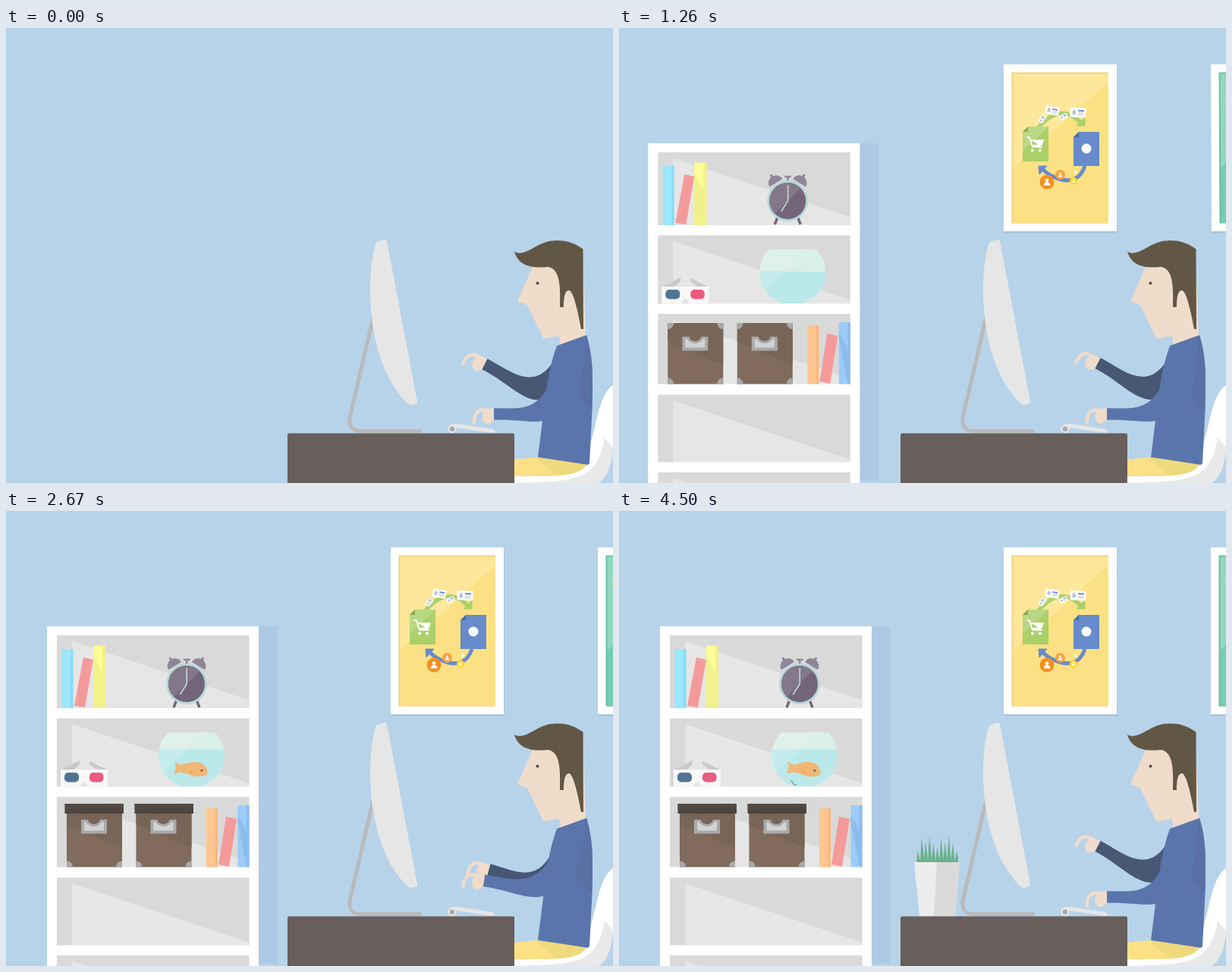
Write an HTML page that moves like this. It is 800x600 px and loops after 4530 ms.

```html
<!DOCTYPE html>
<html lang="en">
<head>
<meta charset="utf-8">
<title>Desk scene</title>
<style>
html, body { margin: 0; width: 100%; height: 100%; overflow: hidden; background: #b7d3ea; }
svg { display: block; width: 800px; height: 600px; }
</style>
</head>
<body>
<svg viewBox="0 0 800 600">
  <defs>
    <g id="bay">
      <path fill="#d9d9d9" d="M67 0h253.500v96h-253.500z"/>
      <path fill="#e6e6e6" d="M87 7.500L320.500 85.500V96H87z"/>
    </g>
    <g id="box">
      <path fill="#806b5d" d="M0 0h73v80.500h-73z"/>
      <path fill="#786558" d="M0 0H73V55L0 25z"/>
      <path fill="#a9a9a9" d="M0 0h8a8 8 0 0 1-8 8zM73 0v8a8 8 0 0 1-8-8zM0 80.500v-8a8 8 0 0 1 8 8zM73 80.500h-8a8 8 0 0 1 8-8z"/>
      <path fill="#a9a9a9" d="M19 18h34v18.500h-34z"/>
      <path fill="#d2d2d2" d="M23 21h26v11.500h-26z"/>
      <path fill="#a9a9a9" d="M25 18a11 9 0 0 0 22 0z"/>
      <path fill="#786558" d="M28 17.500a8 6.500 0 0 0 16 0z"/>
    </g>
    <g id="lidShape">
      <path fill="#4e4541" d="M0-6.500h77.500v13H0z"/>
      <path fill="#584e49" d="M0-6.500H77.500V-2L0 1z" opacity=".5"/>
    </g>
    <g id="bell">
      <path fill="#8f8598" d="M-10 5A10 10 0 0 1 10 5z"/>
      <path fill="#8f8598" d="M-1.500-8h3v4h-3z"/>
    </g>
    <g id="hand" fill="#f0dcca">
      <path d="M1-7.500L-10-7Q-16-4-15.500 4Q-15 12-9 13Q-4 13 1 7z"/>
      <path d="M-9-5Q-27-8-26 12" fill="none" stroke="#f0dcca" stroke-width="4.500" stroke-linecap="round"/>
    </g>
    <g id="person" fill="#fff">
      <circle cy="-2.200" r="2.300"/>
      <path d="M-4.500 4.500Q-4 0 0 0T4.500 4.500z"/>
    </g>
    <g id="card">
      <path fill="#fff" d="M-9-5.500h18v11h-18z"/>
      <path fill="#b9c4d4" d="M-6.500-1l2-2.500 2 2.500v3.500h-4z"/>
      <path fill="#678bcb" d="M0-3h7v1.800h-7z"/>
      <path fill="#c6c6c6" d="M0 0h7v1h-7zM0 2h7v1h-7z"/>
    </g>
    <clipPath id="bowlClip"><path d="M213.500 292H275.500A42.500 42.500 0 0 1 257 363H232A42.500 42.500 0 0 1 213.500 292z"/></clipPath>
  </defs>

  <rect width="800" height="600" fill="#b7d3ea"/>

  <g id="shelf">
    <path fill="#aec9e3" d="M333 152h25v445h-25z"/>
    <path fill="#fff" d="M54 152H333V600H54z"/>
    <use href="#bay" y="164"/>
    <path fill="#fff" d="M54 260h279v13h-279z"/>
    <use href="#bay" y="273.500"/>
    <path fill="#fff" d="M54 363.500h279v13.500h-279z"/>
    <use href="#bay" y="377"/>
    <path fill="#fff" d="M54 469.500h279v14h-279z"/>
    <use href="#bay" y="483.500"/>
    <path fill="#fff" d="M54 572.500h279v13.500h-279z"/>
    <use href="#bay" y="586"/>

    <!-- books -->
    <path fill="#9be8fe" d="M73.500 182h15v78h-15z"/>
    <path fill="#8adcf4" d="M85 182h3.500v78h-3.500z"/>
    <path fill="#f49a9a" d="M102 193l13 3-11 63-14-2z"/>
    <path fill="#fdfd96" d="M115 177.500h16v82.500h-16z"/>
    <path fill="#f1f18c" d="M127 177.500h4v82.500h-16V190l12 25z"/>
    <path fill="#fdc690" d="M264 392h15v77.500h-15z"/>
    <path fill="#f6b880" d="M275.500 392h3.500v77.500h-3.500z"/>
    <path fill="#f49a9a" d="M290 403l14 3-10 63-14-3z"/>
    <path fill="#9ccbfa" d="M305.500 388h15v81.500h-15z"/>
    <path fill="#8dbdee" d="M317 388h3.500v81.500h-3.500l-11.500-60v-8l11.500 20z"/>

    <!-- clock -->
    <path d="M225 249l-4 10M251 249l4 10" stroke="#74657a" stroke-width="3.500"/>
    <use href="#bell" transform="translate(220 200) rotate(-32)"/>
    <use href="#bell" transform="translate(256 200) rotate(32)"/>
    <path d="M234 196h8.500M238.200 196v6" stroke="#8f8598" stroke-width="2.600"/>
    <circle cx="238" cy="228" r="27" fill="#b5d9d6"/>
    <circle cx="238" cy="228" r="24" fill="#74657a"/>
    <path fill="#84778a" d="M221 245A24 24 0 0 1 255 211z"/>
    <path d="M238.300 207v21l-9 14" fill="none" stroke="#c9e3e2" stroke-width="1.400"/>

    <!-- glasses -->
    <path fill="#c9c9c9" d="M73 341l24-12v5l-9 8zM133 341l-23-11v4l10 8z"/>
    <path fill="#f8f8f8" d="M72 341h62v22.500h-25l-6-8-6 8h-25z"/>
    <rect x="77" y="345" width="19" height="12.500" rx="5" fill="#4f7595"/>
    <rect x="110" y="345" width="18.500" height="12.500" rx="5" fill="#ec5a7f"/>

    <!-- bowl -->
    <g clip-path="url(#bowlClip)">
      <path fill="#d9efe9" d="M200 290h90v75h-90z"/>
      <path id="water" fill="#bbe9e9"/>
      <path fill="#fff" opacity=".14" d="M200 290H262L208 345L200 340z"/>
    </g>
    <g id="fish">
      <path fill="#f0b775" d="M222 330Q229 336 234 334Q250 328 260 334Q267 340 265 348Q255 352 245 349Q236 345 229 344Q226 346 221 346Q226 339 222 330z"/>
      <path fill="#e5a864" d="M240 342q6 0 8 5-6-1-8-5z"/>
      <circle cx="258" cy="342.200" r="1.300" fill="#5a4c40"/>
    </g>
    <path id="speck" d="M3.500-3.500q1.500 4-2 4t-4.500 2.500" fill="none" stroke="#6f9ea3" stroke-width="1.200"/>

    <use href="#box" x="80" y="389"/>
    <use href="#box" x="171.500" y="389"/>
    <use href="#lidShape" id="lidA"/>
    <use href="#lidShape" id="lidB"/>
  </g>

  <!-- posters hang from their top left corner -->
  <g id="posterA">
    <path fill="#a9c5df" d="M1 2h149v220.500h-149z"/>
    <path fill="#fff" d="M0 0h149v220h-149z"/>
    <path fill="#eed27a" d="M10.500 10.500h127.500v199h-127.500z"/>
    <path fill="#fce184" d="M12.500 12.500H138V209.500H12.500z"/>
    <path fill="#fee79a" d="M12.500 12.500H138V23L12.500 136z"/>
    <g transform="translate(-507 -48)">
      <path d="M553 131Q581 98 608 124" fill="none" stroke="#abd06a" stroke-width="5.500"/>
      <path fill="#abd06a" d="M614 118v11h-11z" stroke="#abd06a"/>
      <path d="M614 182Q606 205 583 200Q568 196 558 186" fill="none" stroke="#678bcb" stroke-width="5"/>
      <path fill="#678bcb" d="M553 182h11l-10 11z" stroke="#678bcb"/>
      <path fill="#abd06a" d="M539 130h27v46h-34v-39z"/>
      <path fill="#b9d884" d="M539 130h27l-34 32v-25z"/>
      <path fill="#85ab4c" d="M539 130v7h-7z"/>
      <path d="M537 144h4l4 13h13M542 148h17l-2 6-13 1z" fill="#fff" stroke="#fff" stroke-width="1.600"/>
      <circle cx="545" cy="161.500" r="2" fill="#fff"/><circle cx="555" cy="161.500" r="2" fill="#fff"/>
      <path fill="#678bcb" d="M606 137h27v45h-34v-38z"/>
      <path fill="#4a6aa8" d="M606 137v7h-7z"/>
      <circle cx="616" cy="159" r="6.500" fill="#fff"/>
      <use href="#card" transform="translate(571 109) rotate(10)"/>
      <use href="#card" transform="translate(605 111.500) rotate(3) scale(1.150)"/>
      <use href="#card" transform="translate(558 120) rotate(-50) scale(.6)"/>
      <use href="#card" transform="translate(586 117) rotate(-25) scale(.6)"/>
      <circle cx="564" cy="203" r="9.500" fill="#f78f1e"/><use href="#person" x="564" y="203"/>
      <circle cx="581.500" cy="193.500" r="6.500" fill="#f9a23f"/><use href="#person" transform="translate(581.500 193.500) scale(.65)"/>
      <circle cx="602" cy="190" r="4" fill="#fbe27a"/><use href="#person" transform="translate(602 190) scale(.5)"/>
      <circle cx="599" cy="201.500" r="5" fill="#fbd52f"/><use href="#person" transform="translate(599 201.500) scale(.5)"/>
    </g>
  </g>
  <g id="posterB">
    <path fill="#a9c5df" d="M1 2h149v220.500h-149z"/>
    <path fill="#fff" d="M0 0h149v220h-149z"/>
    <path fill="#68bfa5" d="M10.500 10.500h127.500v199h-127.500z"/>
    <path fill="#74ccb1" d="M12.500 12.500H138V209.500H12.500z"/>
    <path fill="#94d7c1" d="M12.500 12.500H138V23L12.500 136z"/>
    <circle cx="24.500" cy="44.500" r="5.500" fill="#f3e38b"/>
    <path fill="#fff" d="M20.500 169h60v29h-60z"/>
  </g>

  <g id="plant">
    <path id="grass" fill="#6bb089"/>
    <path fill="#ececec" d="M389 463h60l-6 71.500h-47z"/>
    <path fill="#dadada" d="M419 463h30l-6 71.500h-28z"/>
  </g>

  <path d="M484 381L453.500 512Q450 531.500 468 531.500H545.500" fill="none" stroke="#bababa" stroke-width="5" stroke-linecap="round"/>
  <path fill="#e6e6e6" d="M490 281.500L499 279Q501.500 278.500 502 281L542 492Q542.300 495 540 495.500L534 497Q531 497 529 495C498 465 480 410 480 345Q480 308 487.500 284Q488 282 490 281.500z"/>
  <rect x="371" y="534.500" width="299" height="70" rx="2" fill="#685e5b"/>

  <path fill="#fff" d="M670 591C720 592 758 590 768 573L771 545C779 520 782 482 801 470V555L789 541C784 575 775 592 745 596Q710 600 670 600z"/>
  <path fill="#e9e9e9" d="M789 541L800 554C798 580 791 595 780 600H690C760 597 779 592 789 541z"/>
  <path fill="#fce085" d="M670 569L700 566L766 575L758 583Q742 591 715 591H670z"/>
  <path fill="#efd97d" d="M698 566L766 575L758 583Q745 590 724 590z"/>

  <use href="#hand" id="backHand"/>
  <path id="backArm" fill="#475774"/>
  <path fill="#f0dcca" d="M694 315L674 360L687 365.500L708.500 409.500L729 406L731 420L764 406L760 300L714 312z"/>
  <path fill="#625744" d="M670 295C685 303 700 281 722 280.500C738 279 750 284 760.500 291.500L761 397H758C754 375 748 347 742 346C736 346 735 358 735 368H730C731 340 730 317 714 315C695 317 676 315 670 295z"/>
  <circle cx="700.500" cy="336.500" r="2.100" fill="#5a4c40"/>
  <path fill="#5a75ab" d="M765 405L726 419C718 440 712 470 708 510L701 566L767 576L769 574L772.500 505C774 460 773 430 765 405z"/>
  <path id="shade" fill="#5a70a5"/>
  <use href="#hand" id="frontHand"/>
  <path id="frontArm" fill="#5a75ab"/>

  <path fill="#e6e6e6" d="M586 523Q592 521 602 523L641 529L645.500 532L641 534L594 527z"/>
  <circle cx="588" cy="528.500" r="5.700" fill="#e6e6e6"/>
  <circle cx="588" cy="528.800" r="3.200" fill="#a9a9a9"/>
</svg>
<script>
const LOOP = 4530, TICK = 30, CYCLE = 18;
const el = {};
document.querySelectorAll('[id]').forEach(n => el[n.id] = n);
const clamp = x => Math.min(1, Math.max(0, x));
const mix = (a, b, k) => a + (b - a) * k;
const ramp = (t, from, to) => clamp((t - from) / (to - from));
const place = (node, value) => node.setAttribute('transform', value);
const show = (node, on) => node.setAttribute('visibility', on ? 'visible' : 'hidden');

// Five poses per six ticks: the first pose of each group is held twice.
function poseAt(ms) {
  const tick = Math.floor(ms / TICK);
  return 5 * Math.floor(tick / 6) + Math.max(0, tick % 6 - 1);
}

// 1 = fingers on the keys, 0 = hand raised.
function press(t, hit) {
  const d = ((t - hit) % CYCLE + CYCLE) % CYCLE;
  if (d < 9) return (1 - clamp((d - 1) / 8)) ** 2;
  const x = clamp((5.9 - (CYCLE - d)) / 4.9);
  return x * x * (3 - 2 * x);
}

function drawArm(arm, hand, h, dx, dy) {
  const x = 620 + dx + 23 * h * h, y = 445 + dy + 64 * h;
  const deg = 27 * (1 - h), a = deg * Math.PI / 180;
  const c = Math.cos(a), s = Math.sin(a), w = 7.8;
  const tx = x + s * w, ty = y - c * w, bx = x - s * w, by = y + c * w;
  const p = [
    'M', tx, ty,
    'C', tx + 34 * c, ty + 34 * s, mix(697, 708, h), mix(482, 510, h), 724, mix(435, 445, h),
    'L', 750, 430, 742, 472, mix(712, 708, h), mix(488, 518, h),
    'C', mix(680, 690, h) + dx / 2, mix(498, 521, h), bx + 40 * c, by + 40 * s, bx, by, 'Z'
  ];
  arm.setAttribute('d', p.join(' '));
  place(hand, `translate(${x} ${y}) rotate(${deg})`);
}

function drawPoster(node, x, u) {
  show(node, u > 0);
  const turn = -90 * Math.exp(-u / 4.3) * Math.cos(Math.PI * u / 13);
  place(node, `translate(${x} 48) rotate(${u > 34 ? 0 : turn}) scale(${clamp(u / 5.5)})`);
}

function drawLid(node, x, t, start, grown, shut) {
  show(node, t > start);
  const y = mix(220, 392.5, ramp(t, 48, 62.5) ** 1.5);
  place(node, `translate(${x} ${y}) rotate(${-90 * (1 - ramp(t, start, shut))}) scale(${ramp(t, start, grown)})`);
}

function draw(t) {
  const front = press(t, 17.5);
  drawArm(el.frontArm, el.frontHand, front, 0, 0);
  drawArm(el.backArm, el.backHand, press(t, 5.5), 11, -3);
  el.shade.setAttribute('d', `M765 405Q773 430 773 460L772 505L${mix(742, 755, front)} ${mix(473, 487, front)}L762 430z`);

  drawPoster(el.posterA, 507, t);
  drawPoster(el.posterB, 780, t - 10.4);

  const slide = t < 22.3 ? 400 : Math.max(0, 361.5 * Math.exp((22.3 - t) / 4.17) - 1.5);
  place(el.shelf, `translate(${-slide} 0)`);

  const u = Math.max(0, t - 28);
  const level = 364 - 50 * (1 - Math.exp(-u / 3.6));
  const tilt = t > 45 ? 0 : 6 * Math.exp(-u / 8) * Math.sin(u / 2.6);
  el.water.setAttribute('d', `M200 ${level - tilt}L290 ${level + tilt}V370H200z`);
  show(el.water, u > 0);

  show(el.fish, t >= 47);
  place(el.fish, `translate(0 ${-205 * (1 - ramp(t, 47, 55) ** 2)})`);
  show(el.speck, t >= 78);
  const sink = (t - 86) / 39;
  place(el.speck, `translate(${231.5 - 2 * sink + Math.sin(sink * 9)} ${348.5 + 9.5 * sink}) rotate(${70 * sink})`);

  drawLid(el.lidA, 77.5, t, 48, 58, 62);
  drawLid(el.lidB, 169.5, t, 50, 62.6, 66.5);

  const g = ramp(t, 77, 85) - 1;
  show(el.plant, t > 77);
  place(el.plant, `translate(0 534.5) scale(1 ${1 + 2.7 * g ** 3 + 1.7 * g * g}) translate(0 -534.5)`);
}

let blades = '';
for (let i = 0; i < 11; i++) {
  const x = 392 + i * 5, top = 463 - [20, 33, 27, 35, 25][i % 5] * (i % 10 ? 1 : .75);
  blades += `M${x} 463L${x + 2.5 + (i - 5) * .15} ${top}L${x + 5.5} 463z`;
}
el.grass.setAttribute('d', blades);

const start = performance.now();
function frame() {
  draw(poseAt((performance.now() - start) % LOOP));
  requestAnimationFrame(frame);
}
frame();
</script>
</body>
</html>
```
